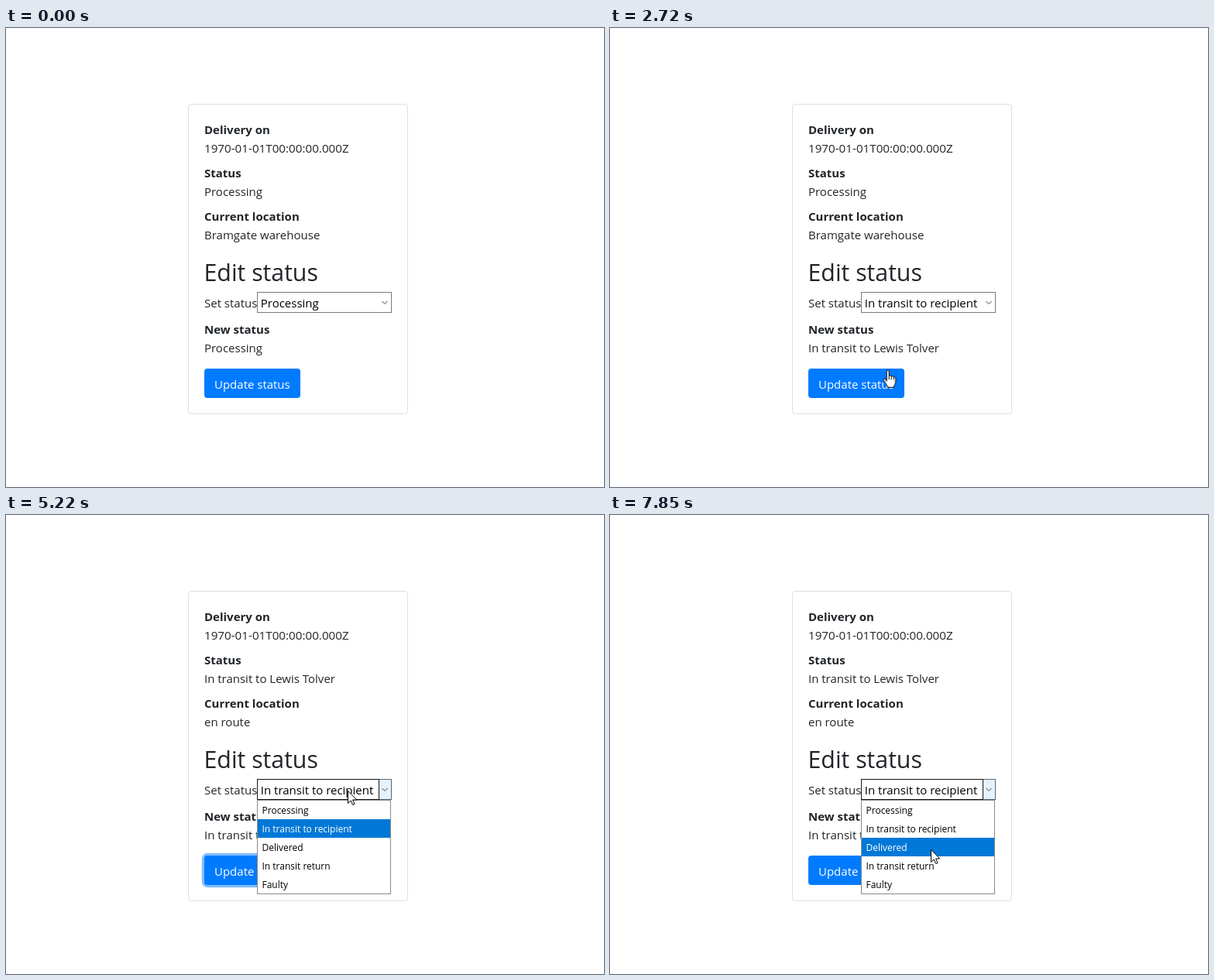
An HTML page for the animation above (8 s loop, 772x593 px).

```html
<!DOCTYPE html>
<html lang="en">
<head>
<meta charset="utf-8">
<title>Delivery status</title>
<style>
  html, body { margin: 0; width: 100%; height: 100%; overflow: hidden; background: #fff; }
  svg { display: block; }
  text { font: 15px "Open Sans", "Noto Sans", sans-serif; fill: #212529; }
  .label { font-weight: 700; }
  .date { font-size: 15.2px; }
  .title { font-size: 30.3px; }
  .field { fill: #000; }
  .caption { fill: #fff; }
  .menu text { font-size: 12px; fill: #000; }

  /* 1% of the loop is 80 ms */
  .anim { animation: 8s step-end infinite; }

  .unpicked { animation-name: unpicked; }
  .picked { animation-name: picked; }
  .unsaved { animation-name: unsaved; }
  .saved { animation-name: saved; }
  @keyframes unpicked { 0% { opacity: 1 } 22.25%, 100% { opacity: 0 } }
  @keyframes picked { 0% { opacity: 0 } 22.25%, 100% { opacity: 1 } }
  @keyframes unsaved { 0% { opacity: 1 } 47.625%, 100% { opacity: 0 } }
  @keyframes saved { 0% { opacity: 0 } 47.625%, 100% { opacity: 1 } }

  .hover { animation-name: hover; }
  @keyframes hover {
    0%, 29.125% { opacity: 0 }
    5.625%, 61.375%, 100% { opacity: 1 }
  }

  .menu { animation-name: menu; }
  @keyframes menu {
    0%, 22.25% { opacity: 0 }
    8.5%, 65.25%, 100% { opacity: 1 }
  }
  .bar { fill: #0078d7; animation-name: bar; }
  @keyframes bar {
    0% { transform: translateY(0) }
    17.4% { transform: translateY(24px) }
    83.5625% { transform: translateY(48px) }
    84.625% { transform: translateY(72px) }
    96.25%, 100% { transform: translateY(48px) }
  }
  .item1 { animation-name: item1; }
  .item2 { animation-name: item2; }
  .item3 { animation-name: item3; }
  .item4 { animation-name: item4; }
  @keyframes item1 { 0% { fill: #fff } 17.4%, 100% { fill: #000 } }
  @keyframes item2 { 0% { fill: #000 } 17.4% { fill: #fff } 83.5625%, 100% { fill: #000 } }
  @keyframes item3 { 0%, 84.625% { fill: #000 } 83.5625%, 96.25%, 100% { fill: #fff } }
  @keyframes item4 { 0% { fill: #000 } 84.625% { fill: #fff } 96.25%, 100% { fill: #000 } }

  .button { animation-name: button; }
  @keyframes button {
    0% { fill: #007bff }
    33.97% { fill: #007bff; animation-timing-function: ease-in-out }
    35.85% { fill: #0069d9 }
    45.625% { fill: #0062cc }
    48.625% { fill: #0069d9 }
    55.5% { fill: #0069d9; animation-timing-function: ease-in-out }
    57.375%, 100% { fill: #007bff }
  }
  .ring { fill: none; stroke: #007bff; animation-name: ring; }
  @keyframes ring {
    0% { stroke-width: 0; stroke-opacity: 0 }
    45.625% { stroke-width: 5px; stroke-opacity: .42 }
    46.75% { stroke-width: 6.4px; stroke-opacity: .5 }
    65.25% { stroke-width: 6.4px; stroke-opacity: .5; animation-timing-function: ease-in-out }
    67.125%, 100% { stroke-width: 0; stroke-opacity: 0 }
  }

  .pointer { animation-name: travel; }
  @keyframes travel {
    0% { transform: translate(524px, 475.7px) }
    2.75% { transform: translate(524px, 475.7px); animation-timing-function: steps(4, start) }
    6.59% { transform: translate(440px, 353px) }
    13.5% { transform: translate(440px, 353px); animation-timing-function: steps(6, start) }
    19.35% { transform: translate(396px, 401px) }
    29.125% { transform: translate(396px, 401px); animation-timing-function: steps(9, start) }
    37.84% { transform: translate(340px, 462px) }
    53.625% { transform: translate(340px, 462px); animation-timing-function: steps(4, start) }
    57.375% { transform: translate(392px, 418px); animation-timing-function: steps(6, start) }
    63.375% { transform: translate(441px, 356px) }
    68.125% { transform: translate(441px, 356px); animation-timing-function: steps(4, start) }
    73% { transform: translate(435px, 354px) }
    78% { transform: translate(435px, 354px); animation-timing-function: steps(5, start) }
    82.5% { transform: translate(428px, 401px); animation-timing-function: steps(3, start) }
    85.6875% { transform: translate(419px, 443px) }
    86.5% { transform: translate(418px, 442px) }
    96.25% { transform: translate(418px, 442px); animation-timing-function: steps(3, start) }
    99.0625%, 100% { transform: translate(414px, 432px) }
  }
  .pointer path { fill: #fff; stroke: #000; stroke-linejoin: round; }
  .pointer .beam { fill: none; }
  .arrow { animation-name: arrow; }
  .beam { animation-name: beam; }
  .hand { animation-name: hand; }
  @keyframes arrow {
    0%, 29.125%, 33.97%, 56.4375% { opacity: 0 }
    2.75%, 32.03%, 55.5%, 58.375%, 100% { opacity: 1 }
  }
  @keyframes beam {
    0%, 32.03%, 58.375%, 100% { opacity: 0 }
    29.125%, 56.4375% { opacity: 1 }
  }
  @keyframes hand {
    0%, 55.5%, 100% { opacity: 0 }
    33.97% { opacity: 1 }
  }
</style>
</head>
<body>
<svg width="772" height="593" viewBox="0 0 772 593">
  <rect x="235.5" y="98.5" width="283" height="400" rx="3.5" fill="#fff" stroke="#dfdfdf"/>

  <text class="label" x="256" y="137">Delivery on</text>
  <text class="date" x="256" y="161">1970-01-01T00:00:00.000Z</text>
  <text class="label" x="256" y="193">Status</text>
  <text class="anim unsaved" x="256" y="217">Processing</text>
  <text class="anim saved" x="256" y="217">In transit to Lewis Tolver</text>
  <text class="label" x="256" y="249">Current location</text>
  <text class="anim unsaved" x="256" y="273">Bramgate warehouse</text>
  <text class="anim saved" x="256" y="273">en route</text>

  <text class="title" x="255.5" y="327">Edit status</text>
  <text x="256" y="361">Set status</text>
  <rect x="324.5" y="341.5" width="173" height="26" fill="#fff" stroke="#7a7a7a"/>
  <g class="anim hover">
    <rect x="481.5" y="341.5" width="16" height="26" fill="#e5f1fb" stroke="#56697a"/>
    <rect x="324.5" y="341.5" width="157" height="26" fill="#fff" stroke="#171717"/>
  </g>
  <text class="field anim unpicked" x="328.8" y="361">Processing</text>
  <text class="field anim picked" x="328.8" y="361">In transit to recipient</text>
  <path d="M485.5 353l3.5 3.5l3.5 -3.5" fill="none" stroke="#444"/>

  <text class="label" x="256" y="395">New status</text>
  <text class="anim unpicked" x="256" y="419">Processing</text>
  <text class="anim picked" x="256" y="419">In transit to Lewis Tolver</text>

  <rect class="anim ring" x="256" y="440" width="124" height="38" rx="4"/>
  <rect class="anim button" x="256" y="440" width="124" height="38" rx="4"/>
  <text class="caption" x="269" y="466">Update status</text>

  <g class="anim menu">
    <rect x="324.5" y="368.5" width="172" height="121" fill="#fff" stroke="#8a8a8a"/>
    <rect class="anim bar" x="325" y="369" width="171" height="24"/>
    <text class="anim item1" x="330.5" y="386">Processing</text>
    <text class="anim item2" x="330.5" y="410">In transit to recipient</text>
    <text class="anim item3" x="330.5" y="434">Delivered</text>
    <text class="anim item4" x="330.5" y="458">In transit return</text>
    <text x="330.5" y="482">Faulty</text>
  </g>

  <g class="anim pointer">
    <path class="anim arrow" d="M.5 .5V16.5L4.2 13L6.7 18.5L9 17.5L6.6 12H11.7Z"/>
    <path class="anim beam" d="M-3 -7.5H4M.5 -7.5V7.5M-3 7.5H4"/>
    <path class="anim hand" d="M-1.5 14.5V2a1.5 1.5 0 0 1 3 0V8.5a1.5 1.5 0 0 1 3 .5a1.5 1.5 0 0 1 3 .8a1.4 1.4 0 0 1 2.5 1V15c0 3 -1 4 -2 5.5V22.5H-.5V21C-2 18.5 -4 16 -5.3 13.6c-.9 -1.8 1.2 -2.8 2.3 -1.5zM1.5 8.5v4M4.5 9v3.5M7.5 10v2.5"/>
  </g>
</svg>
</body>
</html>
```
